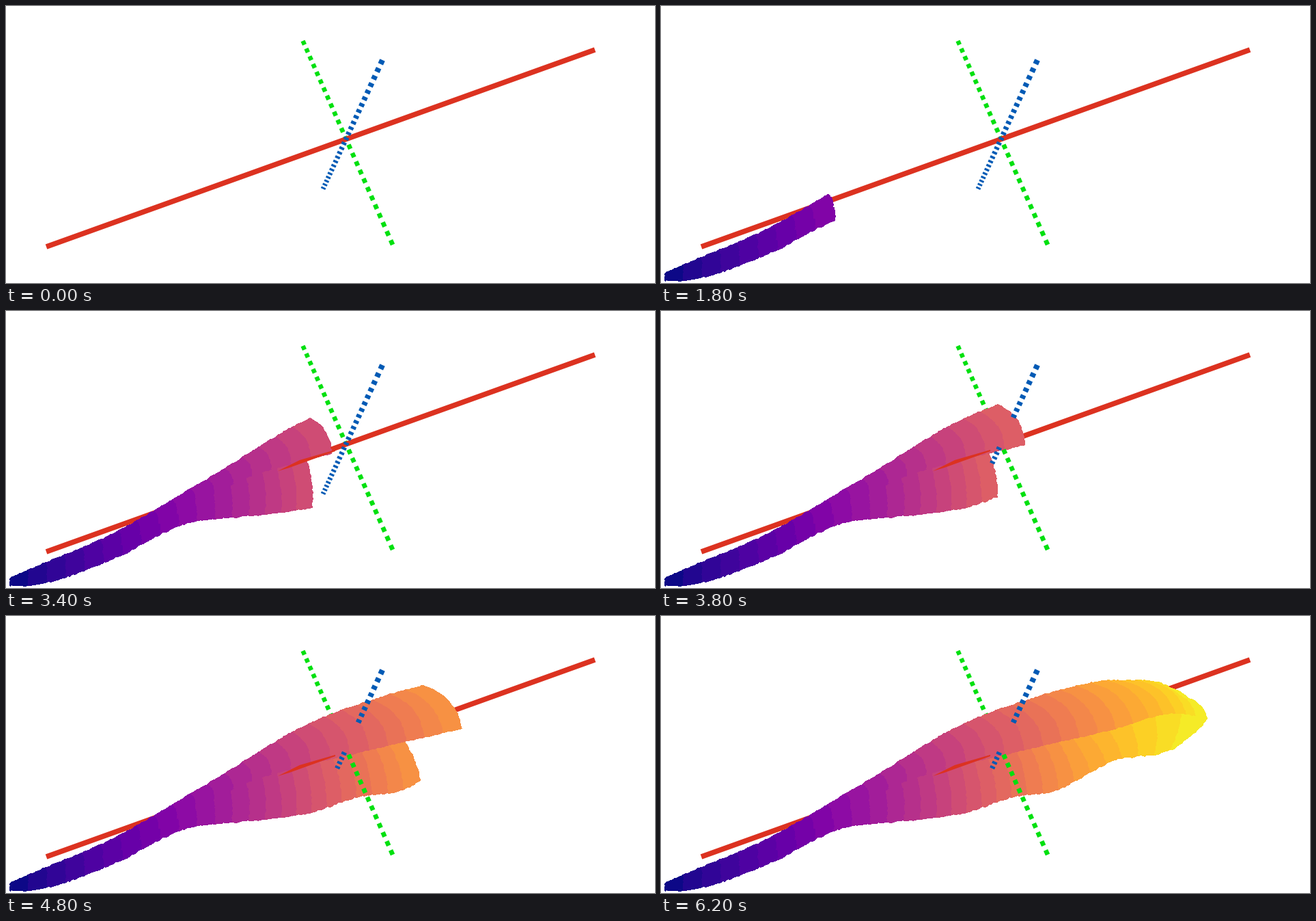
Animation, 950 px wide and 405 px high, one loop 6600 ms. Source, as a matplotlib script:

```python
import matplotlib.pyplot as plt
import numpy as np
from matplotlib.animation import FuncAnimation
from matplotlib.patches import Polygon

W, H = 950, 405
SLICES = 31
RED, GREEN, BLUE = "#DC3220", "#00E00F", "#005AB5"
rng = np.random.default_rng(4)

fig = plt.figure(figsize=(W / 100, H / 100), dpi=100, facecolor="white")
ax = fig.add_axes([0, 0, 1, 1])
ax.set_xlim(0, W)
ax.set_ylim(H, 0)
ax.axis("off")


def smooth(*points):
    """Cubic Hermite curve y(x) through a few key points."""
    px, py = np.array(points, float).T
    slope = np.gradient(py, px)

    def curve(x):
        i = np.clip(np.searchsorted(px, x) - 1, 0, px.size - 2)
        h = px[i + 1] - px[i]
        u = (x - px[i]) / h
        v = 1 - u
        return (v * v * ((1 + 2 * u) * py[i] + u * h * slope[i])
                + u * u * ((1 + 2 * v) * py[i + 1] - v * h * slope[i + 1]))
    return curve


def rough(curve, amount):
    """The same curve with a ragged outline."""
    grid = np.arange(0, W, 3)
    wobble = rng.uniform(-amount, amount, grid.size)
    return lambda x: curve(x) + np.interp(x, grid, wobble)


top_edge = rough(smooth((6, 391), (30, 380), (146, 331), (300, 243), (445, 157),
                        (540, 122), (675, 94), (742, 103), (799, 147)), 1.2)
crease = rough(smooth((6, 397), (150, 350), (265, 288), (353, 243), (437, 218),
                      (521, 198), (655, 167), (760, 142), (799, 149)), 0.8)
bottom_edge = rough(smooth((6, 401), (30, 401), (150, 365), (265, 310), (356, 299),
                           (449, 286), (515, 264), (575, 255), (660, 212),
                           (760, 187), (799, 150)), 1.4)

# Reach of each slice along the three edges; the upper lobe overhangs the lower.
steps = np.arange(SLICES + 1)
top_x = smooth((0, 6), (13, 347), (21, 540), (31, 766))(steps)
nose_x = smooth((0, 6), (13, 361), (21, 587), (27, 736), (31, 799))(steps)
fold_x = smooth((0, 6), (13, 353), (21, 522), (27, 656), (31, 799))(steps)
low_x = smooth((0, 6), (13, 356), (21, 537), (31, 770))(steps)


def rim(start, end, bulge):
    """Bowed, slightly ragged front of one slice."""
    start, end = np.array(start), np.array(end)
    dx, dy = end - start
    control = (start + end) / 2 + bulge * np.array([dy, -dx])
    t = np.linspace(0, 1, 18)[:, None]
    curve = (1 - t) ** 2 * start + 2 * t * (1 - t) * control + t ** 2 * end
    curve[1:-1, 0] += rng.uniform(-1, 1, 16)
    return curve


def along(edge, x0, x1):
    x = np.linspace(x0, x1, 12)
    return np.column_stack([x, edge(x)])


def lobe(near_edge, near_x, far_edge, far_x, bulge, z):
    """One coloured band per slice, each ending at that slice's rim."""
    rims = [rim((a, near_edge(a)), (b, far_edge(b)), bulge)
            for a, b in zip(near_x, far_x)]
    bands = []
    for k in range(1, SLICES + 1):
        color = plt.cm.plasma((k - 1) / SLICES)
        outline = np.vstack([along(near_edge, near_x[k - 1], near_x[k]), rims[k],
                             along(far_edge, far_x[k], far_x[k - 1]),
                             rims[k - 1][::-1]])
        patch = Polygon(outline, facecolor=color, edgecolor=color, lw=0.5,
                        antialiased=False, zorder=z)
        bands.append((k, ax.add_patch(patch)))
    return bands


def bar(p, q, width, color, z):
    dx, dy = (q - p) / np.hypot(*(q - p))
    side = np.array([-dy, dx]) * width / 2
    ax.add_patch(Polygon([p + side, q + side, q - side, p - side],
                         facecolor=color, lw=0, zorder=z))


def dashed(start, end, ratio, widths, color, depth):
    """Evenly dashed line seen in perspective; depth(y) gives the layer."""
    start, end = np.array(start), np.array(end)

    def at(t):
        return start + (end - start) * t / (t + ratio * (1 - t))

    for t in np.arange(25) / 24.5:
        p, q = at(t), at(t + 0.5 / 24.5)
        bar(p, q, np.interp(t, [0, 1], widths), color, depth((p[1] + q[1]) / 2))


def blue_depth(y):
    if y < 154 or 200 < y < 224:
        return 5
    return 2 if y < 197 else 0


def green_depth(y):
    return 5 if y > 202 else 0


bar(np.array([59, 352]), np.array([862, 64]), 7.6, RED, 1)
dashed((434.5, 51), (566, 349), 1.09, (6.5, 6.8), GREEN, green_depth)
dashed((464, 267.5), (551, 79), 1.56, (7, 8.2), BLUE, blue_depth)

# (first step on which it shows, artist)
timed = lobe(crease, fold_x, bottom_edge, low_x, 0.1, 3)
timed += lobe(top_edge, top_x, crease, nose_x, 0.3, 4)

# The solid axis shows through the fold as a thin wedge.
wedge = Polygon([(398, 234), (430, 218), (482, 203), (482, 205), (440, 220), (415, 229)],
                facecolor=RED, lw=0, zorder=4.5)
timed.append((16, ax.add_patch(wedge)))


def update(frame):
    for first, artist in timed:
        artist.set_visible(frame >= first)
    return [artist for _, artist in timed]


anim = FuncAnimation(fig, update, frames=33, interval=200,
                     repeat=True, repeat_delay=0, blit=False)
plt.show()
```
